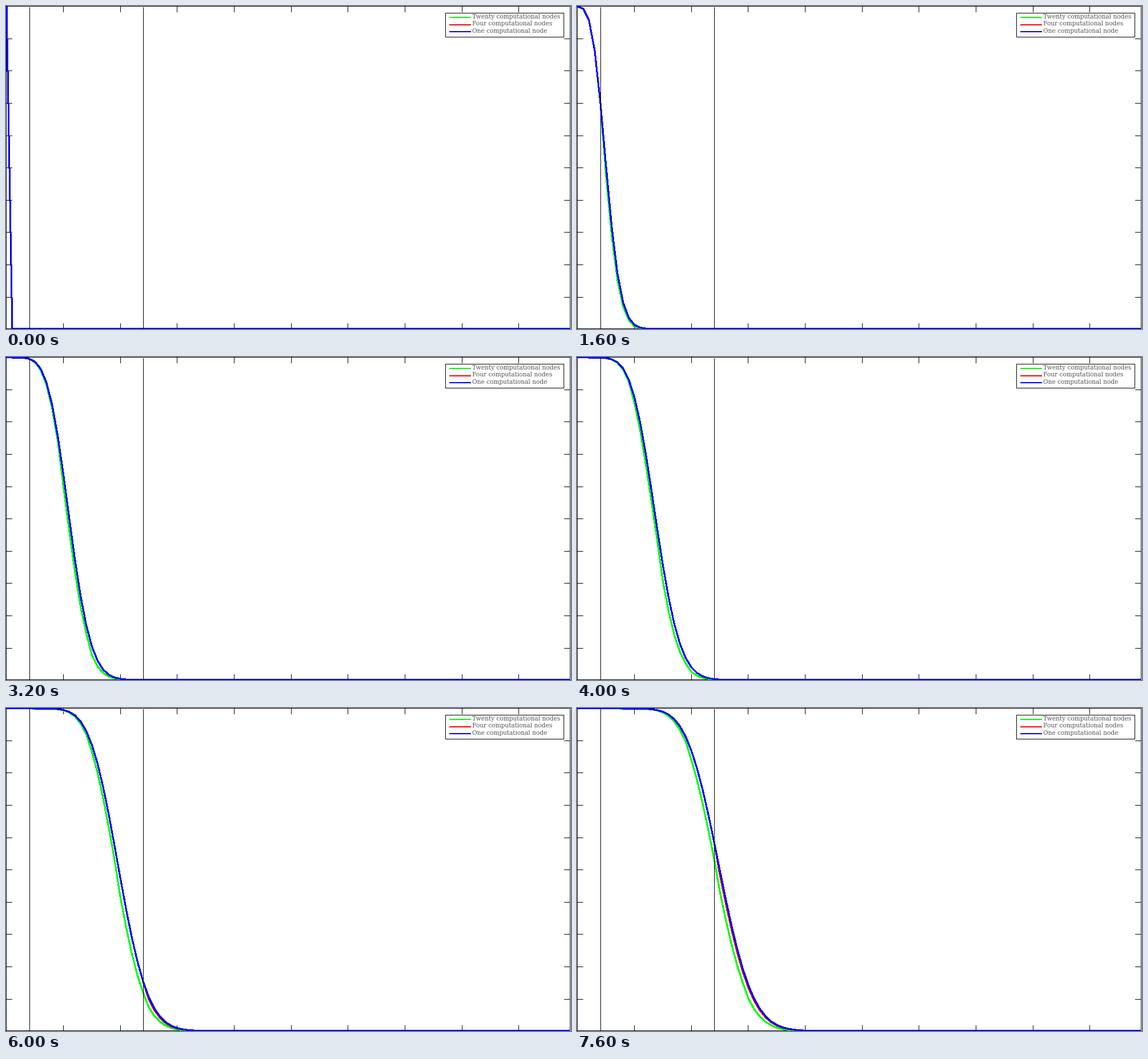
Write a matplotlib script that moves like this. It is 989 px wide and 566 px high and loops after 8000 ms.

```python
import numpy as np
import matplotlib.pyplot as plt
from matplotlib.animation import FuncAnimation
from matplotlib.patches import Rectangle

W, H, DPI = 989, 566, 100
PX = 72 / DPI                      # points per pixel
POINTS, CELL = 100, 9.96
TOP, BASE = 1.0, 565.8             # heights of the values one and zero
COURANT = 0.15
STEPS = [0, 4, 13, 22, 31, 40, 49, 58, 71, 80,
         89, 98, 107, 115, 124, 129, 138, 147, 156, 164]


def advect(nodes):
    """Upwind advection; each node sees its left neighbour one step late."""
    first = np.arange(POINTS // nodes, POINTS, POINTS // nodes)
    u = np.zeros(POINTS)
    u[0] = 1
    before, history = u.copy(), [u.copy()]
    for _ in range(max(STEPS)):
        left = np.roll(u, 1)
        left[0] = 1
        left[first] = before[first - 1]
        before, u = u, u + COURANT * (left - u)
        history.append(u)
    return history


fig = plt.figure(figsize=(W / DPI, H / DPI), dpi=DPI, facecolor="white")
ax = fig.add_axes([0, 0, 1, 1])
ax.set_xlim(0, W)
ax.set_ylim(H, 0)
ax.axis("off")


def line(xs, ys, color="black", width=1.0, z=1):
    return ax.plot(xs, ys, color=color, lw=width * PX, zorder=z, snap=False,
                   antialiased=False, solid_capstyle="butt",
                   solid_joinstyle="miter" if width == 1 else "round")[0]


def box(left, top, right, bottom, z):
    line([left, right, right, left, left],
         [top, top, bottom, bottom, top], z=z)


# Frame, ticks and the two node boundaries
box(0.5, 0.5, 987.5, 565.5, 1)
for j in range(1, 10):
    x = int(0.7 + 99.67 * j) + 0.5
    y = int(0.65 + 56.6 * j) + 0.5
    line([x, x], [0, 11])
    line([x, x], [556, H])
    line([0, 11], [y, y])
    line([977, 988], [y, y])
for x in (41.5, 240.5):
    line([x, x], [2, H], z=5)

# Legend and curves
ax.add_patch(Rectangle((769, 12), 207, 42, facecolor="white", zorder=6))
box(769.5, 12.5, 976.5, 54.5, 7)
SERIES = [(20, "#00ff00", "Twenty computational nodes", 20, 22),
          (4, "#ff0000", "Four computational nodes", 33, 34),
          (1, "#0000ff", "One computational node", 45, 47)]
curves = []
for nodes, color, label, y, baseline in SERIES:
    curves.append((line([], [], color, 2, 3), advect(nodes)))
    line([776, 814], [y, y], color, 2, 7)
    ax.text(816.5, baseline, label, family="DejaVu Serif", size=10.6 * PX,
            color="#555555", va="baseline", zorder=7)

xs = 1 + CELL * np.arange(POINTS)


def draw(frame):
    for curve, history in curves:
        curve.set_data(xs, BASE + (TOP - BASE) * history[STEPS[frame]])
    return [curve for curve, _ in curves]


anim = FuncAnimation(fig, draw, frames=len(STEPS), interval=400,
                     repeat=True, repeat_delay=0, blit=False)
plt.show()
```
